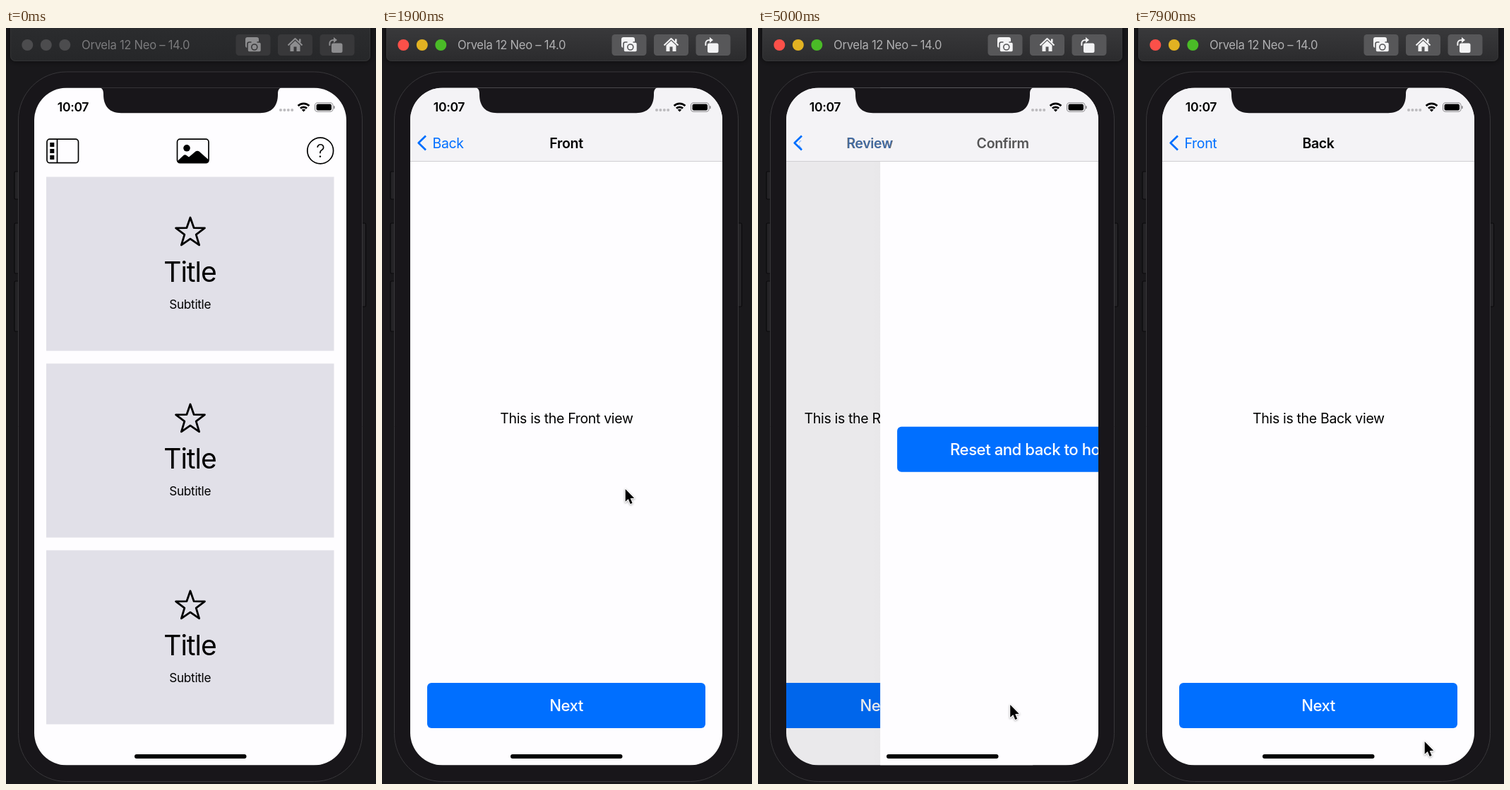
Write an HTML page with a canvas that moves like this. It is 524 px wide and 1069 px high and loops after 8 s.

```html
<!DOCTYPE html>
<html lang="en">
<head>
<meta charset="utf-8">
<title>Navigation demo</title>
<style>
html, body { margin: 0; width: 100%; height: 100%; overflow: hidden; background: #19181b; }
canvas { display: block; width: 524px; height: 1069px; }
</style>
</head>
<body>
<canvas id="stage"></canvas>
<script>
const W = 524, H = 1069, LOOP = 8000, STEP = 100;
const canvas = document.getElementById('stage');
const ctx = canvas.getContext('2d');
const dpr = window.devicePixelRatio || 1;
canvas.width = W * dpr;
canvas.height = H * dpr;

const SCREEN = { x: 40, y: 84.5, w: 442, h: 958, r: 46 };
const MID = 261;
const BLUE = '#006fff', PAPER = '#fefdff', BAR = '#f4f3f6', BEZEL = '#18161a';
const TITLE_LAG = 11;
const PAGES = ['Back', 'Front', 'Back', 'Review', 'Confirm'];
// start time, page left, page entered
const MOVES = [[1181, 0, 1], [3049.3, 1, 2], [4033.3, 2, 3], [4867, 3, 4], [6420, 4, 3], [6900, 3, 2]];
// time, x, y
const POINTER = [
  [400, 498, 768], [500, 430, 688], [600, 366, 617], [700, 340, 594], [1800, 340, 594],
  [2100, 352, 765], [2400, 365, 991], [2700, 356.5, 956], [5400, 356.5, 956],
  [5800, 282, 602], [6100, 140, 230], [6300, 103, 157], [7300, 103, 157],
  [7600, 270, 640], [7900, 411, 1008]
];

const lerp = (a, b, k) => a + (b - a) * k;
const clamp = v => Math.max(0, Math.min(1, v));

// Critically damped spring from 0 to 1
function spring(ms) {
  if (ms <= 0) return 0;
  const u = 0.0183 * ms;
  const v = 1 - (1 + u) * Math.exp(-u);
  return v > 0.9993 ? 1 : v;
}

function track(keys, t) {
  if (t < keys[0][0]) return null;
  for (let i = 1; i < keys.length; i++) {
    const a = keys[i - 1], b = keys[i];
    if (t <= b[0]) {
      const k = (t - a[0]) / (b[0] - a[0]);
      return [lerp(a[1], b[1], k), lerp(a[2], b[2], k)];
    }
  }
  return keys[keys.length - 1].slice(1);
}

function setFont(size, weight, tracking = -0.017) {
  ctx.font = `${weight} ${size}px Inter, "Liberation Sans", sans-serif`;
  ctx.letterSpacing = `${(size * tracking).toFixed(3)}px`;
}

function text(str, x, y, size, weight, color, align = 'center', tracking) {
  setFont(size, weight, tracking);
  ctx.textAlign = align;
  ctx.fillStyle = color;
  ctx.fillText(str, x, y);
}

function box(x, y, w, h, r, fill, stroke, line = 1) {
  ctx.beginPath();
  ctx.roundRect(x, y, w, h, r);
  if (fill) { ctx.fillStyle = fill; ctx.fill(); }
  if (stroke) { ctx.strokeStyle = stroke; ctx.lineWidth = line; ctx.stroke(); }
}

function disc(x, y, r, fill) {
  ctx.beginPath();
  ctx.arc(x, y, r, 0, Math.PI * 2);
  ctx.fillStyle = fill;
  ctx.fill();
}

function poly(points, close) {
  ctx.beginPath();
  points.forEach(([x, y], i) => i ? ctx.lineTo(x, y) : ctx.moveTo(x, y));
  if (close) ctx.closePath();
}

function stroke(color, width) {
  ctx.strokeStyle = color;
  ctx.lineWidth = width;
  ctx.stroke();
}

function scoped(draw) {
  ctx.save();
  draw();
  ctx.restore();
}

// ---- Window and device ----

function toolIcons(ink, back) {
  box(339, 13, 19, 15, 3, ink);
  box(342, 20, 19.5, 14, 2.5, ink, back, 1.6);
  box(347.5, 18, 8, 4, 1.5, ink);
  ctx.beginPath();
  ctx.arc(351.8, 27, 4, 0, Math.PI * 2);
  stroke(back, 1.6);

  poly([[399.5, 24.5], [409.5, 15], [419.5, 24.5]]);
  stroke(ink, 2);
  ctx.fillStyle = ink;
  ctx.fillRect(415, 15.5, 2.5, 5);
  poly([[402.5, 24.5], [409.5, 18], [416.5, 24.5], [416.5, 33], [402.5, 33]], true);
  ctx.fill();
  ctx.fillStyle = back;
  ctx.fillRect(407.5, 26.5, 4, 6.5);

  box(461, 21.5, 15.5, 13.5, 2.5, ink);
  ctx.beginPath();
  ctx.moveTo(458.5, 25);
  ctx.bezierCurveTo(457.5, 19, 459.5, 17, 465, 17);
  stroke(ink, 1.8);
  poly([[464, 13], [469, 17], [464, 21]], true);
  ctx.fillStyle = ink;
  ctx.fill();
}

function titleBar(active) {
  const g = ctx.createLinearGradient(0, 0, 0, 47);
  g.addColorStop(0, active ? '#39393b' : '#2b2c2e');
  g.addColorStop(1, active ? '#2b2b2d' : '#262729');
  scoped(() => {
    ctx.shadowColor = 'rgba(0,0,0,.6)';
    ctx.shadowBlur = 8 * dpr;
    box(6, -8, 510, 55, 7, g);
  });
  box(6.5, -8, 509, 54.5, 7, null, '#3a3a3c', 0.7);
  const lights = active ? ['#fc5049', '#e2b222', '#4abb27'] : ['#4c4c4e', '#4c4c4e', '#4c4c4e'];
  lights.forEach((c, i) => disc(30.3 + i * 26.5, 24, 8, c));
  text('Orvela 12 Neo – 14.0', 107, 30, 16.6, 400, active ? '#b0b0b2' : '#7b7b7d', 'left');
  const back = active ? '#575759' : '#38383a';
  [325.5, 385, 444.5].forEach(x => box(x, 9, 49, 30, 4.5, back));
  toolIcons(active ? '#f3f3f4' : '#8d8d8f', back);
}

function device() {
  ctx.fillStyle = '#19181b';
  ctx.fillRect(0, 0, W, H);
  [[12, 203, 39], [12, 276, 71], [12, 358, 71], [502.5, 276, 118]].forEach(
    ([x, y, h]) => box(x, y, 7, h, 1.5, '#242326', '#0b0a0c', 1.2));
  box(17.5, 62, 487, 1003.5, 68, BEZEL, '#38373a', 1);
}

function notch() {
  ctx.beginPath();
  ctx.moveTo(129, 83);
  ctx.bezierCurveTo(136, 84, 138, 87, 138, 94);
  ctx.bezierCurveTo(138, 111, 147, 120.2, 163, 120.2);
  ctx.lineTo(360, 120.2);
  ctx.bezierCurveTo(376, 120.2, 385, 111, 385, 94);
  ctx.bezierCurveTo(385, 87, 387, 84, 394, 83);
  ctx.closePath();
  ctx.fillStyle = BEZEL;
  ctx.fill();
}

function statusBar() {
  text('10:07', 95, 118, 17.6, 600, '#000', 'center', -0.02);
  for (let i = 0; i < 4; i++) disc(389 + i * 5.4, 116, 2, '#bcbbbe');
  scoped(() => {
    ctx.beginPath();
    ctx.moveTo(421.5, 118.5);
    ctx.arc(421.5, 118.5, 14, -Math.PI * 0.74, -Math.PI * 0.26);
    ctx.clip();
    disc(421.5, 118.5, 3.8, '#000');
    [6.7, 11.6].forEach(r => {
      ctx.beginPath();
      ctx.arc(421.5, 118.5, r, 0, Math.PI * 2);
      stroke('#000', 2.7);
    });
  });
  box(437.5, 105.7, 25.5, 12.6, 3.8, null, '#8b8a8d', 1.1);
  box(439.5, 107.6, 21.5, 8.8, 2.2, '#000');
  box(464, 110, 1.6, 4.2, 0.8, '#8b8a8d');
}

// ---- Pages ----

function star(cx, cy) {
  const pts = Array.from({ length: 10 }, (_, i) => {
    const r = i % 2 ? 8.6 : 21.5, a = i * Math.PI / 5;
    return [cx + r * Math.sin(a), cy - r * Math.cos(a)];
  });
  poly(pts, true);
  stroke('#000', 2.8);
}

function homeIcons() {
  box(58, 157.2, 44.5, 33.5, 4, null, '#000', 1.7);
  poly([[72.5, 157], [72.5, 191]]);
  stroke('#000', 1.7);
  [162, 171, 180].forEach(y => { ctx.fillStyle = '#000'; ctx.fillRect(62.3, y, 6, 6); });

  box(242.5, 157.2, 44.5, 33.5, 4, null, '#000', 1.7);
  disc(256, 169.8, 4.8, '#000');
  ctx.beginPath();
  ctx.moveTo(243, 188);
  ctx.lineTo(251.5, 180);
  ctx.quadraticCurveTo(253.5, 178.5, 255.5, 180);
  ctx.lineTo(259, 182.5);
  ctx.lineTo(268.5, 174.5);
  ctx.quadraticCurveTo(271, 172.8, 273.5, 174.5);
  ctx.lineTo(286.5, 186);
  ctx.lineTo(286.5, 190);
  ctx.lineTo(243, 190);
  ctx.closePath();
  ctx.fillStyle = '#000';
  ctx.fill();

  ctx.beginPath();
  ctx.arc(445.2, 173.5, 18.4, 0, Math.PI * 2);
  stroke('#000', 1.7);
  text('?', 445.2, 182.5, 25, 300, '#000');
}

function home(press) {
  homeIcons();
  for (let i = 0; i < 3; i++) {
    const y = 210.5 + i * 264;
    ctx.fillStyle = '#e1e0e8';
    ctx.fillRect(57, y, 407.5, 246);
    scoped(() => {
      if (i === 1) ctx.globalAlpha = press;
      star(MID, y + 79);
      text('Title', MID - 0.5, y + 148.5, 39, 400, '#000', 'center', -0.026);
      text('Subtitle', MID - 0.3, y + 186.5, 17.2, 400, '#000');
    });
  }
}

function button(label, y) {
  box(64, y, 394, 64, 6, BLUE);
  text(label, MID, y + 40, 22.2, 500, '#fff', 'center', -0.022);
}

function page(i, dx, press) {
  scoped(() => {
    ctx.translate(dx, 0);
    ctx.fillStyle = PAPER;
    ctx.fillRect(SCREEN.x, SCREEN.y, SCREEN.w, SCREEN.h);
    if (i === 0) return home(press);
    if (i === 4) return button('Reset and back to home', 563.7);
    text(`This is the ${PAGES[i]} view`, MID + 0.4, 558.5, 19.5, 400, '#000');
    button('Next', 926);
  });
}

// ---- Navigation bar ----

function navBase() {
  ctx.fillStyle = BAR;
  ctx.fillRect(SCREEN.x, SCREEN.y, SCREEN.w, 188 - SCREEN.y);
  ctx.fillStyle = '#d0cfd2';
  ctx.fillRect(SCREEN.x, 188, SCREEN.w, 1);
}

function chevron() {
  poly([[62, 152.5], [51.7, 162.5], [62, 172.5]]);
  stroke(BLUE, 2.7);
}

function navTitle(str, x, alpha) {
  ctx.globalAlpha = clamp(alpha);
  text(str, x, 169.5, 19.5, 600, '#000');
  ctx.globalAlpha = 1;
}

function navLabel(str, x, alpha, align = 'left') {
  ctx.globalAlpha = clamp(alpha);
  text(str, x, 169.5, 19.5, 400, BLUE, align);
  ctx.globalAlpha = 1;
}

function width(str, weight) {
  setFont(19.5, weight);
  return ctx.measureText(str).width;
}

function navBar(low, high, k) {
  navBase();
  chevron();
  if (k < 1) {
    scoped(() => {
      ctx.beginPath();
      ctx.rect(58, 140, 300, 44);
      ctx.clip();
      navLabel(PAGES[low - 1], 71.5 - 82 * k, 1 - k);
    });
  }
  const name = PAGES[low];
  const x = lerp(MID, 71.5 + width(name, 400) / 2, k);
  navTitle(name, x, 1 - k * k);
  if (k > 0) {
    navLabel(name, x, k * k, 'center');
    const next = PAGES[high];
    navTitle(next, MID + (210 + width(next, 600) / 2) * (1 - k), k);
  }
}

function slidingBar(i, dx) {
  scoped(() => {
    ctx.translate(dx, 0);
    navBase();
    chevron();
    navLabel(PAGES[i - 1], 71.5, 1);
    navTitle(PAGES[i], MID, 1);
  });
}

// ---- Scene ----

function edgeShadow(x, k) {
  const g = ctx.createLinearGradient(x - 12, 0, x, 0);
  g.addColorStop(0, 'rgba(0,0,0,0)');
  g.addColorStop(1, `rgba(0,0,0,${0.025 * (1 - k)})`);
  ctx.fillStyle = g;
  ctx.fillRect(x - 12, SCREEN.y, 12, SCREEN.h);
}

function screen(t) {
  const [start, from, to] = MOVES.filter(m => m[0] <= t).pop() || [Infinity, 0, 1];
  const push = to > from;
  const progress = ms => push ? spring(ms) : 1 - spring(ms);
  const low = Math.min(from, to), high = Math.max(from, to);
  const k = progress(t - start);
  const titleK = progress(t - start + (push ? -TITLE_LAG : TITLE_LAG));
  const press = t < 900 ? 1 : t < 1000 ? 0.35 : t < 1200 ? 0.2 : clamp(0.5 + (t - 1200) / 270);
  const dx = SCREEN.w * (1 - k);

  if (k < 1) {
    page(low, -0.3 * SCREEN.w * k, press);
    ctx.fillStyle = `rgba(10,8,8,${0.115 * k})`;
    ctx.fillRect(SCREEN.x, SCREEN.y, SCREEN.w, SCREEN.h);
  }
  if (k > 0) {
    edgeShadow(SCREEN.x + dx, k);
    page(high, dx, 1);
  }
  if (low > 0) navBar(low, high, titleK);
  else if (k > 0) slidingBar(high, dx);
}

function pointer([x, y]) {
  scoped(() => {
    ctx.translate(x + 0.7, y + 1);
    ctx.scale(0.95, 0.95);
    poly([[0, 0], [0, 18.8], [4.3, 14.8], [7.4, 22], [10.4, 20.7], [7.4, 13.8], [13.2, 13.4]], true);
    ctx.shadowColor = 'rgba(0,0,0,.35)';
    ctx.shadowBlur = 3 * dpr;
    ctx.shadowOffsetY = dpr;
    stroke('#fff', 2.2);
    ctx.shadowColor = 'transparent';
    ctx.fillStyle = '#000';
    ctx.fill();
  });
}

function draw(t) {
  ctx.setTransform(dpr, 0, 0, dpr, 0, 0);
  ctx.lineJoin = 'round';
  device();
  titleBar(t >= 900);
  scoped(() => {
    ctx.beginPath();
    ctx.roundRect(SCREEN.x, SCREEN.y, SCREEN.w, SCREEN.h, SCREEN.r);
    ctx.clip();
    screen(t);
    notch();
    statusBar();
    box(182, 1027, 158.5, 6, 3, '#000');
  });
  const pos = track(POINTER, t);
  if (pos) pointer(pos);
}

const origin = performance.now();
function tick() {
  const t = (performance.now() - origin) % LOOP;
  draw(Math.floor(t / STEP) * STEP);
  requestAnimationFrame(tick);
}
tick();
</script>
</body>
</html>
```
